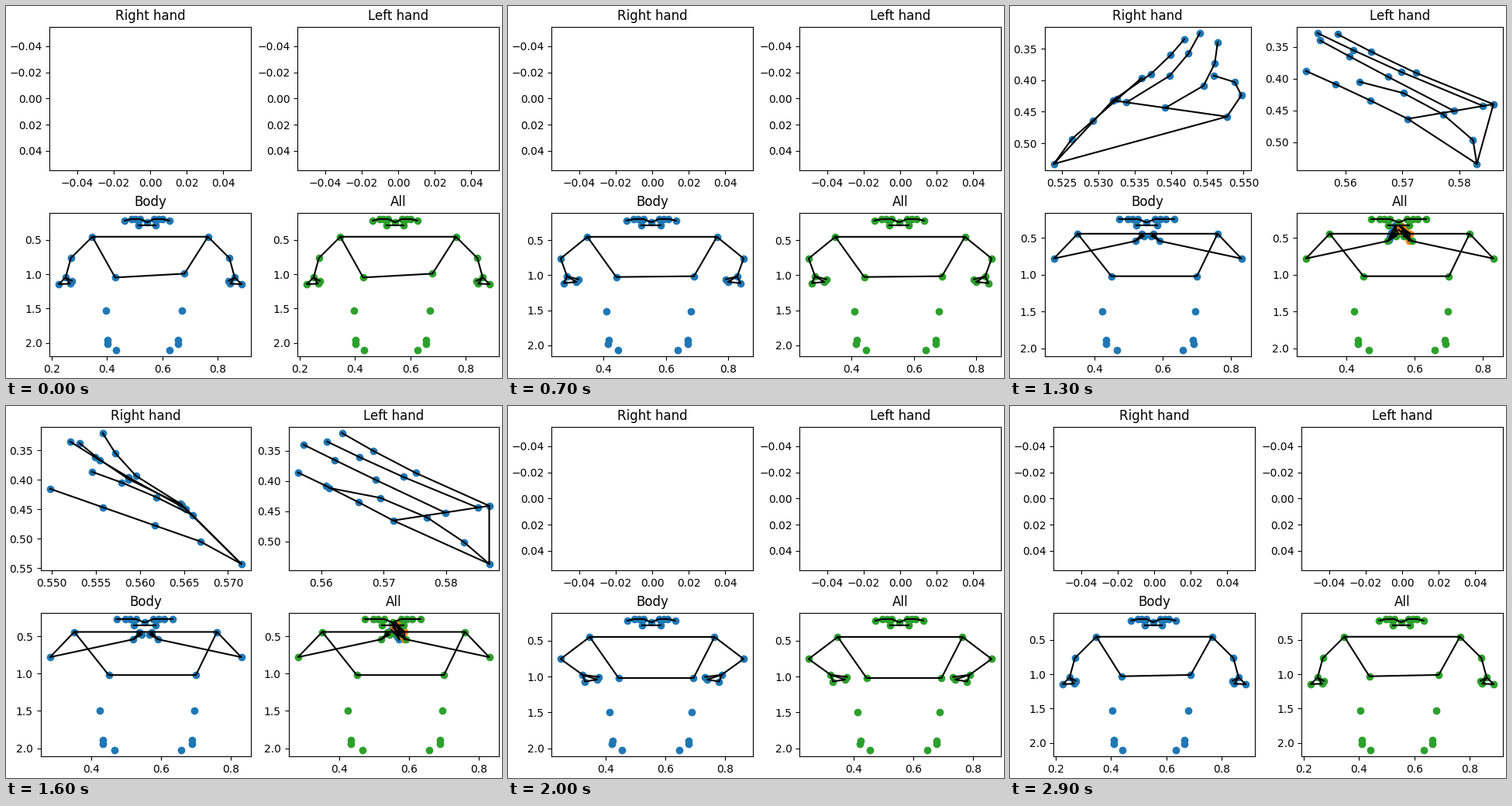
Recreate the animation shown at these times as a matplotlib script. Size 640 px wide and 480 px high, loop 3 s.

```python
import numpy as np
import matplotlib.pyplot as plt
from matplotlib.animation import FuncAnimation

FRAMES, INTERVAL = 30, 100
HANDS_SEEN = range(9, 19)
HANDS_UP = (11, 16)
HAND_FLIP = 14
SIDES = (("r", -1), ("l", 1))


def glide(*keys):
    """Smooth curve without overshoot through (frame, value) keys."""
    t, y = np.array(keys, dtype=float).T
    h = np.diff(t)
    d = np.diff(y) / h
    a, b = d[:-1], d[1:]
    same = a * b > 0
    inner = np.where(same, 2 * a * b / np.where(same, a + b, 1), 0)
    m = np.concatenate([d[:1], inner, d[-1:]])
    f = np.arange(FRAMES)
    i = np.clip(np.searchsorted(t, f, "right") - 1, 0, len(h) - 1)
    s = (f - t[i]) / h[i]
    return (y[i] * (1 + 2 * s) * (1 - s) ** 2 + y[i + 1] * s * s * (3 - 2 * s)
            + h[i] * s * (1 - s) * (m[i] * (1 - s) - m[i + 1] * s))


# Arm lift: 0 hanging, 1 bent in front of the hips, 2 hands clasped at the chest.
LIFT = glide((0, 0), (7, .43), (11, 2), (16, 2), (20, 1), (25, 0), (29, 0))
NOD = glide((0, 0), (7, 0), (11, .022), (16, .072), (20, 0), (29, 0))
START = np.clip(1 - np.arange(FRAMES) / 7, 0, 1) ** 2

# Distance from the midline and height of each arm joint, in the three lift poses.
ARM_MID = .556
ARM = {
    "shoulder": [(.2085, .455), (.208, .447), (.2045, .442)],
    "elbow": [(.286, .766), (.305, .755), (.274, .78)],
    "wrist": [(.305, 1.048), (.2315, .976), (.036, .542)],
    "pinky": [(.330, 1.145), (.2235, 1.069), (.0175, .447)],
    "index": [(.289, 1.138), (.1835, 1.042), (.0145, .468)],
    "thumb": [(.283, 1.097), (.177, 1.005), (.011, .474)],
}

# Midline, distance from it and height.
HIP_Y = 1.02
LEG = {
    "hip": (.569, .125, HIP_Y),
    "knee": (.551, .136, 1.53),
    "ankle": (.55, .127, 1.96),
    "heel": (.55, .128, 2.015),
    "toe": (.55, .096, 2.1),
}

FACE_MID, EYE_Y = .553, .198
EYES = {"eye1": .025, "eye2": .041, "eye3": .056}

BODY_LINES = [
    "ear_r eye3_r eye2_r eye1_r nose eye1_l eye2_l eye3_l ear_l".split(),
    ["mouth_r", "mouth_l"],
    ["shoulder_r", "shoulder_l", "hip_l", "hip_r", "shoulder_r"],
]
for side, _ in SIDES:
    for chain in ("shoulder elbow wrist pinky index wrist", "wrist thumb"):
        BODY_LINES.append([f"{name}_{side}" for name in chain.split()])


def body_at(frame):
    lift, nod, start = LIFT[frame], NOD[frame], START[frame]
    lean = -.008 * start
    mid, eye_y = FACE_MID + lean, EYE_Y + nod
    ear_y = eye_y + .022 * max(0, 1 - nod / .02)
    squash = 1 - .072 * min(lift, 1)
    tilt = .01 * max(1 - lift, 0) + .018 * start

    body = {"nose": (mid, eye_y + .046)}
    for side, sign in SIDES:
        for name, reach in EYES.items():
            body[f"{name}_{side}"] = (mid + sign * reach, eye_y)
        body[f"ear_{side}"] = (mid + sign * .08, ear_y)
        body[f"mouth_{side}"] = (mid + sign * .031, eye_y + .088)
        for name, poses in ARM.items():
            reach, y = (np.interp(lift, range(3), v) for v in zip(*poses))
            body[f"{name}_{side}"] = (ARM_MID + sign * reach, y)
        for name, (centre, reach, y) in LEG.items():
            y = HIP_Y + (y - HIP_Y) * squash
            x = centre + lean + .006 * (lift - 1) * y + sign * reach
            body[f"{name}_{side}"] = (x, y)
        x, y = body[f"hip_{side}"]
        body[f"hip_{side}"] = (x, y - sign * tilt)
    return {name: np.array(p) for name, p in body.items()}


HAND_LINES = [[0, 1, 2, 3, 4], [0, 5, 6, 7, 8], [5, 9, 13, 17, 0],
              [9, 10, 11, 12], [13, 14, 15, 16], [17, 18, 19, 20]]
KNUCKLES = (0, .12, .46, 1)
THUMB_JOINTS = np.array([0, .3, .65, 1])
FINGER_JOINTS = np.array([0, .49, .78, 1])
PINKY_JOINTS = np.array([0, .37, .71, 1])


def finger(base, tip, joints, bow):
    """Four joints from base to tip, bowed sideways."""
    base, (dx, dy) = np.array(base), np.subtract(tip, base)
    normal = np.array([dy, -dx]) / np.hypot(dx, dy)
    arc = 4 * joints * (1 - joints) * bow
    return base + np.outer(joints, (dx, dy)) + np.outer(arc, normal)


def make_hand(x_range, y_range, wrist, thumb, index, pinky, tips, bows):
    """Hand sketched on a free grid, then fitted to the given ranges.

    bows: sideways bend of the thumb, the index finger and the little finger.
    """
    index, pinky = np.array(index), np.array(pinky)
    parts = [np.array([wrist]), finger(thumb, tips[0], THUMB_JOINTS, bows[0])]
    for k, at in enumerate(KNUCKLES):
        joints = PINKY_JOINTS if k == 3 else FINGER_JOINTS
        bow = bows[1] + (bows[2] - bows[1]) * k / 3
        parts.append(finger(index + (pinky - index) * at, tips[k + 1], joints, bow))
    pts = np.concatenate(parts)
    lo, hi = pts.min(axis=0), pts.max(axis=0)
    first, last = np.transpose([x_range, y_range])
    return first + (pts - lo) / (hi - lo) * (last - first)


RIGHT_A = make_hand(
    (.5239, .5497), (.3252, .5328),
    wrist=(57, 204), thumb=(80, 172), index=(133, 122), pinky=(280, 143),
    tips=[(170, 93), (225, 43), (245, 35), (268, 47), (263, 90)],
    bows=(0, -6, -28))
RIGHT_B = make_hand(
    (.5498, .5715), (.3208, .5429),
    wrist=(304, 204), thumb=(251, 175), index=(225, 126), pinky=(241, 141),
    tips=[(57, 107), (125, 35), (95, 48), (83, 46), (111, 85)],
    bows=(0, 12, -3))
LEFT_A = make_hand(
    (.5509, .5854), (.3242, .5320),
    wrist=(590, 204), thumb=(601, 173), index=(624, 129), pinky=(520, 147),
    tips=[(468, 97), (414, 45), (384, 35), (407, 48), (382, 88)],
    bows=(-14, 4, -1))
LEFT_B = make_hand(
    (.5563, .5869), (.3205, .5372),
    wrist=(620, 204), thumb=(588, 176), index=(620, 129), pinky=(498, 148),
    tips=[(417, 106), (433, 35), (414, 46), (384, 50), (377, 86)],
    bows=(-14, 4, -1))


def hands_at(frame, body):
    """Both hands, carried along by the wrists while the arms rise and sink."""
    if frame not in HANDS_SEEN:
        return None, None
    held = int(np.clip(frame, *HANDS_UP))
    mix = (held - HANDS_UP[0]) / (HANDS_UP[1] - HANDS_UP[0])
    right = RIGHT_A if frame < HAND_FLIP else RIGHT_B
    left = LEFT_A + (LEFT_B - LEFT_A) * mix
    up = body_at(held)
    return (right + body["wrist_r"] - up["wrist_r"],
            left + body["wrist_l"] - up["wrist_l"])


def draw_points(ax, points, lines, color):
    if points is None:
        return
    cloud = np.array(list(points.values()) if isinstance(points, dict) else points)
    ax.scatter(cloud[:, 0], cloud[:, 1], color=color)
    for chain in lines:
        xy = np.array([points[k] for k in chain])
        ax.plot(xy[:, 0], xy[:, 1], color="black")


fig, axes = plt.subplots(2, 2, figsize=(6.4, 4.8), dpi=100, layout="constrained")
ax_right, ax_left, ax_body, ax_all = axes.flat


def draw(frame):
    titles = ("Right hand", "Left hand", "Body", "All")
    for ax, title in zip(axes.flat, titles):
        ax.clear()
        ax.set_title(title)

    body = body_at(frame)
    right, left = hands_at(frame, body)
    for ax, hand in ((ax_right, right), (ax_left, left)):
        draw_points(ax, hand, HAND_LINES, "C0")
        if hand is None:
            ax.set(xlim=(-.055, .055), ylim=(-.055, .055))
    draw_points(ax_body, body, BODY_LINES, "C0")
    draw_points(ax_all, right, HAND_LINES, "C0")
    draw_points(ax_all, left, HAND_LINES, "C1")
    draw_points(ax_all, body, BODY_LINES, "C2")

    for ax in axes.flat:
        ax.invert_yaxis()
    return []


anim = FuncAnimation(fig, draw, frames=FRAMES, interval=INTERVAL,
                     repeat=True, repeat_delay=0, blit=False)
plt.show()
```
